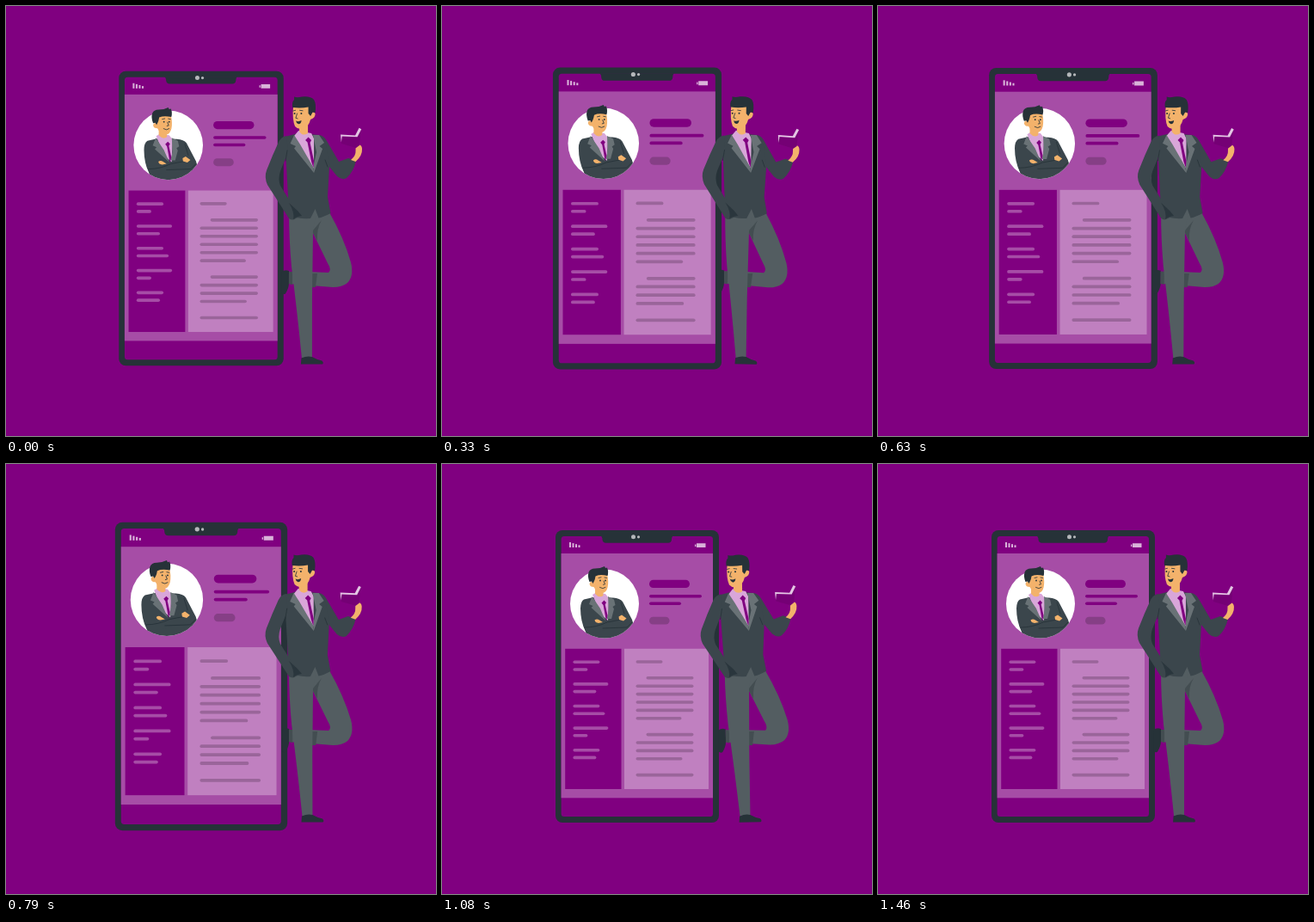
These frames come from a looping animation (500x500 px, 1500 ms). An HTML page:

```html
<!DOCTYPE html>
<html lang="en">
<head>
<meta charset="utf-8">
<title>Profile on a phone</title>
<style>
  html, body { margin: 0; height: 100%; overflow: hidden; background: #800080; }
  svg { display: block; width: 100%; height: 100%; }
  .ink { fill: #263238; }
  .suit { fill: #3b464c; }
  .lapel { fill: #697276; }
  .pants { fill: #535d61; }
  .fold { fill: #434d51; }
  .skin { fill: #f3b26b; }
  .shirt { fill: #d9a6d9; }
  .brand { fill: #800080; }
  .tint { fill: #a64da6; }
  .pale { fill: #c080c0; }
  .text { fill: #9a659a; }
  .tag { fill: #863f86; }
  .light { fill: #d9b3d9; }
  .line { fill: none; stroke: #263238; stroke-width: .8; stroke-linecap: round; }
</style>
</head>
<body>
<svg viewBox="0 0 500 500">
  <!-- The portrait is cut by the disc below, but the head rises above it -->
  <clipPath id="bust"><path d="M149 100H229V162.500A40 40 0 0 1 149 162.500Z"/></clipPath>

  <g id="phone">
    <rect class="ink" x="132" y="77" width="190" height="340" rx="8"/>
    <rect class="brand" x="138.600" y="84" width="176.400" height="326" rx="3.500"/>
    <path class="ink" d="M184 83.500H269Q267 84 267 88Q266.500 91.800 263 91.800H190.500Q187 91.800 186.500 88Q186.500 84 184 83.500Z"/>
    <circle cx="222.500" cy="84.700" r="2.500" fill="#b5b8bb"/>
    <circle cx="228.500" cy="84.800" r="1.600" fill="#b5b8bb"/>
    <path class="light" d="M294 93.500h1.300v2.500H294zM296 92.200h10.500v4.800H296z"/>
    <rect class="tint" x="138.600" y="104" width="176.400" height="284.300"/>
    <rect class="brand" x="143.200" y="214.800" width="65.300" height="163.200"/>
    <rect class="pale" x="212" y="214.800" width="98" height="163.200"/>
    <g id="bars"></g>

    <circle cx="189" cy="162.500" r="40" fill="#fff"/>
    <g clip-path="url(#bust)">
      <path class="suit" d="M176 155L165 157.500Q161 160 161 168Q161 183 167 195L171 206H205L222 189Q223 187 221 181L210 160Q207 156 199 155.500Z"/>
      <path class="shirt" d="M175 152L179 149.500L190 151L194 156L193 182L184 174Z"/>
      <path class="lapel" d="M174.500 154L171 163L175.500 165L173.500 167L190 182L184 168ZM193 154L200 157.500L201.500 164L198.500 166L200 168.500L197 180H191.500L194 170Z"/>
      <path class="brand" d="M188.500 158.500L191 161L189.700 163.500L192.500 176L191 182.500L187.500 164L185.500 161.500Z"/>
      <path class="suit" d="M164 186Q174 186 184 184L209 179L214 186L183 195L168 197Z"/>
      <path class="line" d="M208 161L212 174M166 190Q180 190 192 184L208 181M187 191L215 190L221 184"/>
      <path class="skin" d="M177.500 181.500Q180 179.500 183 181.500L187 184L182 185Q178 184.500 177.500 181.500ZM205.500 177.500L209 175.500L214.500 179.500L211 182.500L206 181Z"/>
      <path class="skin" d="M178 142V151Q183 156.500 187.500 153V147Z"/>
      <path class="skin" d="M175 128H192Q194 136 192.700 143Q191 150.500 185.500 150Q179 148.500 176.500 143Q172 143 171.500 139.500Q172 136 175 137Z"/>
      <path class="ink" d="M171.500 137Q169 131 170.500 126Q172 121.500 178 121.500Q184 121.500 189 119L190 121L192 120.500Q194 125 192.500 130Q184 128 178.500 130.500Q178 134 177 136L175.500 139L174 136.500Z"/>
      <path class="line" d="M182 132.500L185 131.800M189 132L191.500 132.500M188 136L189.500 139.800L187.500 140.300M183.500 143.500Q187 146 190 143.500"/>
      <circle class="ink" cx="184" cy="135.500" r=".9"/><circle class="ink" cx="190" cy="135.500" r=".9"/>
    </g>
  </g>

  <g id="man">
    <path class="ink" d="M321 309Q324 306 329 308V322Q329 328 325 334.500Q323 336 320.500 334Z"/>
    <path class="pants" d="M350 234H368L376 240Q393 270 401 298Q405 314 397 322Q391 327 380 327L329 323V309H350L375 310Q379 307 374 299L356 262Z"/>
    <path class="fold" d="M329 309H333V324L329 323ZM355 311H362L360 327H355ZM356 262L367 249Q361 259 362 273Z"/>
    <path class="pants" d="M329 240L360 243L357 262L356 340V409H344Q338 350 332 303Q329 270 329 240Z"/>
    <path class="ink" d="M343.500 409.500Q350 406.500 356 408Q361 411 367.500 412.500Q370 415 368 416.500H343Z"/>

    <path class="suit" d="M364 150Q370 151 373 157L387 181L398 177L407 180Q404 193 396 200Q391 203 385 198L371 181Z"/>
    <path class="suit" d="M324 152L340 148L364 150Q371 153 373 166L376 186L374 222L377.500 241Q368 246 363.500 246.500L359.500 236L354 247Q340 248 330 243L328 222L326 186Z"/>
    <path class="suit" d="M326 151Q320 152 317 158Q310 173 303 191Q300 199 304 208L329 247Q333 250 337 247L344 244L331 228L319 209Q316 201 319 192L328 170Z"/>
    <path class="ink" d="M329 229L339 238L344 244Q338 244.500 334 248Q336 240 329 229Z" opacity=".75"/>
    <path class="line" d="M327 168L325 180M371 179L374 187"/>
    <path class="shirt" d="M335 151L340 145L355 148L358 154L358 189L343 168Z"/>
    <path class="lapel" d="M335 150L330.500 160L337 163L335 165.500L358 194L357 187L342 161ZM357 150L364 150L370 159L364.500 163L368 166L358 194L357.500 186L361 170Z"/>
    <path class="brand" d="M351.500 152.500L355 156L353.500 159L358 180L357.500 188L355 181L350.500 158.500L348 156Z"/>

    <path class="skin" d="M341 139V146Q345 152 351 148V137Z"/>
    <path class="skin" d="M334 116H354V125Q357 121.500 359.500 125Q360 130 354 132Q352 140 346 142.500Q340 144.500 336 140Q332.500 132 334 116Z"/>
    <path class="ink" d="M333.500 120Q331.500 112 335 109V105.500Q338 107 344 105.500Q354 104.500 358 109Q361 114 359.500 124L356.500 123.500L354 128L351.500 125V117.500Q343 119 333.500 118Z"/>
    <path class="line" d="M333.800 122L336.500 121.300M341.500 121.300L345 121.800M338.500 125L336.800 130.300L339 130.800"/>
    <circle class="ink" cx="335.500" cy="125" r="1"/><circle class="ink" cx="343.300" cy="125" r="1"/>
    <path class="ink" d="M337 133.500Q340 135 343.500 133Q343 137.500 340 137.300Q337.500 136.500 337 133.500Z"/>

    <path class="skin" d="M401 179Q407 174 406.500 168Q406 163 410 161.500Q413.500 161 414 166Q414.500 174 406.500 181Z"/>
    <path fill="#750075" d="M390 152L408 152.500L412.500 144L411 162L407 165L390 160Z"/>
    <path fill="#e3c6e3" d="M389 149.500L406 150.500L410.500 141.800L413.200 143.200L408.500 152.300L390.700 151.500L389.800 158.500Z"/>
  </g>
</svg>

<script>
const LOOP = 1500, FPS = 24;
const phone = document.getElementById('phone');
const man = document.getElementById('man');

// Placeholder text: a rounded bar centred on y
function bar(cls, x, y, width, h = 3.6) {
  return `<rect class="${cls}" x="${x}" y="${y - h / 2}" width="${width}" height="${h}" rx="${h / 2}"/>`;
}

function paragraph(row, lines, indent, lastWidth) {
  let out = '';
  for (let i = 0; i < lines; i++) {
    const inset = i ? 0 : indent;
    const width = i === lines - 1 ? lastWidth : 67 - inset;
    out += bar('text', 225.5 + inset, 230 + (row + i) * 9.4, width);
  }
  return out;
}

let bars = bar('brand', 241, 139.4, 47, 9.2) + bar('brand', 241, 153.7, 61) +
  bar('brand', 241, 162.2, 37) + bar('tag', 241, 182.2, 23.5, 8.8);
for (let i = 0; i < 5; i++) {
  const y = 230.3 + i * 25.6;
  bars += bar('tint', 152.4, y, 31 + i % 2 * 10) + bar('tint', 152.4, y + 8.7, 17 + i % 3 * 10);
}
for (let i = 0; i < 4; i++) {
  bars += `<rect class="light" x="${148 + i * 3.5}" y="${91 + i * 1.1}" width="2" height="${6 - i * 1.1}"/>`;
}
bars += paragraph(0, 1, 0, 31) + paragraph(2, 6, 12, 53) +
  paragraph(9, 4, 12, 54) + paragraph(14, 1, 0, 67);
document.getElementById('bars').innerHTML = bars;

// Linear rise from 0 to 1 and back
function pulse(t, start, peak, end) {
  return Math.max(0, Math.min((t - start) / (peak - start), (end - t) / (end - peak)));
}

// Triangle wave between -1 and 1
function sway(t) {
  return Math.asin(Math.sin(2 * Math.PI * t / LOOP)) * 2 / Math.PI;
}

function draw(now) {
  const step = Math.floor((now % LOOP + 4) * FPS / 1000) % (LOOP * FPS / 1000);
  const t = 12 + step * 42.3;
  const scale = 1 + .097 * (pulse(t, 0, 150, 450) + pulse(t, 600, 750, 900));
  phone.setAttribute('transform', `translate(227 247) scale(${scale}) translate(-227 -247)`);
  man.setAttribute('transform', `rotate(${sway(t)} 358 261)`);
}

const start = performance.now();
function tick() {
  draw(performance.now() - start);
  requestAnimationFrame(tick);
}
tick();
</script>
</body>
</html>
```
